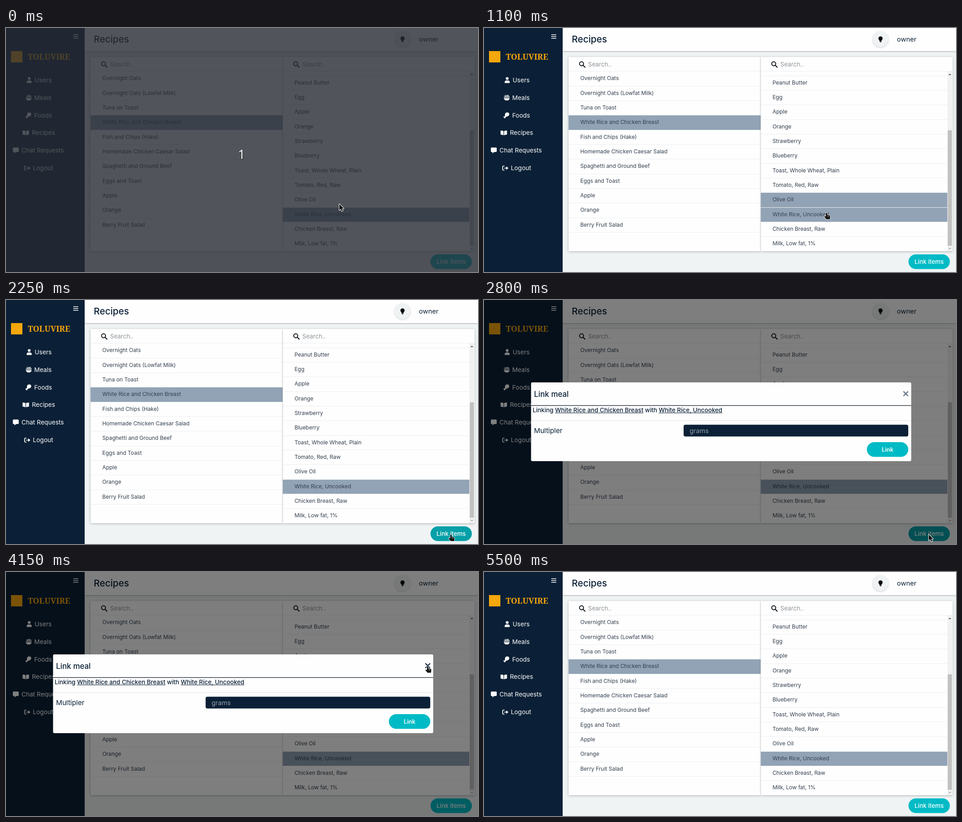
Animation, 1038 px wide and 539 px high, one loop 5900 ms. Source, as an HTML page with a canvas:

```html
<!DOCTYPE html>
<html lang="en">
<head>
<meta charset="utf-8">
<title>Recipes</title>
<style>
  html, body { margin: 0; width: 100%; height: 100%; overflow: hidden; background: #eff3f4; }
  canvas { display: block; }
</style>
</head>
<body>
<canvas id="stage" width="1038" height="539"></canvas>
<script>
const W = 1038, H = 539, LOOP = 5900, STEP = 50;
const ctx = document.getElementById('stage').getContext('2d');
const NAVY = '#0b2036', INK = '#34404f', PICKED = '#92a3b6', ORANGE = '#f5a70c', TEAL = [0, 187, 197], TEAL_DARK = [6, 160, 168];
const SANS = 'Inter, "Open Sans", sans-serif', SERIF = '"Noto Serif", serif';
const ROW = 32.33, LIST_TOP = 96, LIST_END = 493, MEALS_Y = 96.25, FOODS_Y = 105.55;

const meals = ['Overnight Oats', 'Overnight Oats (Lowfat Milk)', 'Tuna on Toast', 'White Rice and Chicken Breast',
  'Fish and Chips (Hake)', 'Homemade Chicken Caesar Salad', 'Spaghetti and Ground Beef', 'Eggs and Toast',
  'Apple', 'Orange', 'Berry Fruit Salad'];
const foods = ['Peanut Butter', 'Egg', 'Apple', 'Orange', 'Strawberry', 'Blueberry', 'Toast, Whole Wheat, Plain',
  'Tomato, Red, Raw', 'Olive Oil', 'White Rice, Uncooked', 'Chicken Breast, Raw', 'Milk, Low fat, 1%'];
const RICE_MEAL = 3, OLIVE = 8, RICE = 9;

// start, end, from, control, to
const moves = [
  [0, 200, [733, 389], [734, 385], [735, 381]],
  [900, 1100, [735, 381], [742, 396], [753, 408]],
  [1800, 2250, [753, 408], [860, 466], [978, 518]],
  [3150, 3750, [978, 518], [1008, 400], [946, 300]],
  [3750, 4150, [946, 300], [932, 180], [927, 208]],
  [4900, 5500, [927, 208], [510, 92], [89, -20]]
];

const ramp = (t, a, b) => Math.min(1, Math.max(0, (t - a) / (b - a)));
const smooth = u => u * u * (3 - 2 * u);
const mix = (a, b, u) => `rgb(${a.map((v, i) => Math.round(v + (b[i] - v) * u))})`;

function pointer(t) {
  const m = moves.filter(v => t >= v[0]).pop();
  const u = smooth(ramp(t, m[0], m[1])), k = 1 - u;
  return [0, 1].map(i => m[2][i] * k * k + 2 * m[3][i] * u * k + m[4][i] * u * u);
}

function rect(x, y, w, h, fill) {
  ctx.fillStyle = fill;
  ctx.fillRect(x, y, w, h);
}

function round(x, y, w, h, r, fill) {
  ctx.fillStyle = fill;
  ctx.beginPath();
  ctx.roundRect(x, y, w, h, r);
  ctx.fill();
}

function disc(x, y, r, fill) {
  ctx.fillStyle = fill;
  ctx.beginPath();
  ctx.arc(x, y, r, 0, Math.PI * 2);
  ctx.fill();
}

// y is the middle of the capitals; returns the width
function text(s, x, y, size, color, weight = 400, align = 'left', family = SANS) {
  ctx.font = `${weight} ${size}px ${family}`;
  ctx.textAlign = align;
  ctx.fillStyle = color;
  ctx.fillText(s, x, y + size * 0.36);
  return ctx.measureText(s).width;
}

function path(d, x, y, fill, stroke, width = 1.5) {
  const p = new Path2D(d);
  ctx.save();
  ctx.translate(x, y);
  ctx.lineJoin = ctx.lineCap = 'round';
  if (stroke) {
    ctx.strokeStyle = stroke;
    ctx.lineWidth = width;
    ctx.stroke(p);
  }
  if (fill) {
    ctx.fillStyle = fill;
    ctx.fill(p);
  }
  ctx.restore();
}

function shadowed(blur, alpha, draw) {
  ctx.save();
  ctx.shadowColor = `rgba(0,0,0,${alpha})`;
  ctx.shadowBlur = blur;
  ctx.shadowOffsetY = 1;
  draw();
  ctx.restore();
}

const menu = [
  ['Users', 63, 115, () => {
    disc(51, 111.5, 3.1, '#fff');
    path('M-5.5 6.5V5Q-5.5 1 -2 1H2Q5.5 1 5.5 5V6.5Z', 51, 115, '#fff');
  }],
  ['Meals', 62, 154, () => {
    path('M-6.5 1H6.5Q6 4 3.5 5V6H-3.5V5Q-6 4 -6.5 1Z', 50, 154, '#fff');
    path('M-6 -1H6M-4 -3H-2M0 -3H2M4 -3H5M-4 -5H-3M-1 -5H4', 50, 154, null, '#fff', 1.3);
  }],
  ['Foods', 62, 193, () => {
    path('M-3 2.5V-1.5Q-2.5 -6.5 2 -6.5Q6.5 -6.5 6.5 -2.5Q6 2 1 2.5L-2 4.5Q-2 7 -4 6.5Q-5 6 -5 5Q-7 4.5 -6 3Q-5 1.5 -3 2.5Z', 49, 193, '#fff');
  }],
  ['Recipes', 57, 231.5, () => {
    path('M-0.6 5.5Q-3 4 -7 4V-5Q-3 -5 -0.6 -3.8ZM0.6 5.5Q3 4 7 4V-5Q3 -5 0.6 -3.8Z', 43.5, 231.5, '#fff');
  }],
  ['Chat Requests', 34, 270, () => {
    round(15, 264, 13, 10, 2, '#fff');
    path('M-2.5 3V7L2.5 3Z', 21, 270, '#fff');
  }],
  ['Logout', 59, 309, () => {
    path('M-2.5 -4.5H-4.5Q-6 -4.5 -6 -3V3Q-6 4.5 -4.5 4.5H-2.5M-2 0H3', 47, 309.5, null, '#fff', 1.7);
    path('M1.8 -4L6.5 0L1.8 4Z', 47, 309.5, '#fff');
  }]
];

function sidebar() {
  rect(0, 0, 173, H, NAVY);
  for (const y of [14, 18, 22]) rect(148, y, 11, 1.5, '#fff');
  rect(11, 51, 25, 25, ORANGE);
  text('TOLUVIRE', 48, 64, 17.7, ORANGE, 900, 'left', SERIF);
  for (const [label, x, y, icon] of menu) {
    icon();
    text(label, x, y, 13.6, '#fff');
  }
}

function header() {
  shadowed(3, 0.3, () => rect(173, 0, W - 173, 51, '#fefefe'));
  text('Recipes', 193, 24.5, 20.4, NAVY, 500);
  shadowed(4, 0.2, () => disc(872, 25, 17, '#eff3f4'));
  disc(872, 23, 4.6, '#000');
  path('M-3 2H3L2 6H-2ZM-1.8 6.5H1.8V7.2L0.8 8H-0.8L-1.8 7.2Z', 872, 23.5, '#000');
  text('owner', 908, 24.5, 14.6, NAVY);
}

function panel(x, width, first, items, active) {
  shadowed(5, 0.28, () => rect(x, 64, 422, 429, '#fefefe'));
  path('M4 4L7.5 7.5', x + 28.5, 79, null, '#111820', 2.2);
  ctx.beginPath();
  ctx.arc(x + 28.5, 79, 4.4, 0, Math.PI * 2);
  ctx.lineWidth = 2;
  ctx.strokeStyle = '#111820';
  ctx.stroke();
  text('Search..', x + 43, 80, 13.2, '#8e9499');
  rect(x, 95, 422, 1, '#eceff1');
  if (first > LIST_TOP + 1) rect(x, Math.round(first) - 1, width, 1, '#eceff1');
  items.forEach((label, i) => {
    const y = first + i * ROW, top = Math.round(y), end = Math.min(LIST_END, Math.round(y + ROW));
    if (active.includes(i)) rect(x, top, width, end - top - 1, PICKED);
    if (end < LIST_END) rect(x, end - 1, width, 1, '#eceff1');
    text(label, x + 25.7, y + 14.8, 11.95, INK);
  });
}

function scrollbar() {
  rect(1019, 96, 12, 397, '#f1f1f1');
  rect(1020, 226, 9, 255, '#c1c1c1');
  path('M-3 1.5L0 -1.5L3 1.5Z', 1024.5, 102.5, '#505050');
  path('M-3 -1.5L0 1.5L3 -1.5Z', 1024.5, 487.5, '#a3a3a3');
}

function modal(hoverClose) {
  rect(0, 0, W, H, 'rgba(0,0,0,.5)');
  round(103.5, 182, 836, 174, 3, '#fefefe');
  text('Link meal', 110, 208, 16.8, NAVY, 500);
  path('M-4.5 -4.5L4.5 4.5M4.5 -4.5L-4.5 4.5', 927.5, 207, null, hoverClose ? NAVY : '#5d6f82', 2.3);
  rect(103.5, 232.5, 836, 1.3, '#1a2430');
  let x = 107;
  for (const [s, linked] of [['Linking ', 0], [meals[RICE_MEAL], 1], [' with ', 0], [foods[RICE], 1]]) {
    const w = text(s, x, 243, 13.25, NAVY, 500);
    if (linked) rect(x, 249, w, 1, NAVY);
    x += w;
  }
  rect(103.5, 266, 836, 1, '#dfe3e6');
  text('Multipler', 110, 288.5, 15.1, NAVY);
  round(439, 275.5, 494, 26, 4, NAVY);
  text('grams', 452, 288.5, 14.3, '#93a0ac');
  round(842, 314, 91, 32.5, 16.25, `rgb(${TEAL})`);
  text('Link', 887.5, 330, 12.8, '#fff', 600, 'center');
}

function cursor([x, y], hand) {
  if (hand) {
    path('M-1 1Q0.5 -1 2 1V5L7 6Q8.5 6.5 8.3 9L7.5 14.5H0L-4.5 9Q-4.5 7 -2.8 7.5L-1 8.5Z', x, y, '#111', '#fff', 1.6);
    path('M3 7V9M5.3 7.5V9.3', x, y, null, '#ddd', 0.8);
  } else {
    path('M0 0V13.5L3.2 10.6L5.4 15.6L7.8 14.5L5.6 9.7H9.8Z', x, y, '#111', '#fff', 2);
  }
}

function rowAt(y, first, count) {
  const i = Math.floor((y - first) / ROW);
  return y > LIST_TOP && y < LIST_END && i >= 0 && i < count ? i : -1;
}

function draw(t) {
  const pos = pointer(t), [x, y] = pos;
  const open = t >= 2800 && t < 4800;
  const live = t >= 50 && !open;
  const left = live && x >= 186 && x < 608 ? rowAt(y, MEALS_Y, meals.length) : -1;
  const right = live && x >= 609 && x < 1019 ? rowAt(y, FOODS_Y, foods.length) : -1;
  const onLink = live && x > 934 && x < 1024 && y > 500 && y < 532;
  const onClose = open && x > 917 && x < 938 && y > 196 && y < 219;
  const chosen = t >= 750 && t < 1700 ? OLIVE : RICE;

  rect(0, 0, W, H, '#eff3f4');
  header();
  sidebar();
  panel(186, 422.5, MEALS_Y, meals, [RICE_MEAL, left]);
  panel(608.7, 410.3, FOODS_Y, foods, [chosen, right]);
  scrollbar();
  const shade = ramp(t, 2100, 2250) - ramp(t, 2800, 3000);
  round(933.5, 500, 91, 32.5, 16.25, mix(TEAL, TEAL_DARK, shade));
  text('Link items', 979, 516, 13.3, '#fff', 500, 'center');
  if (open) modal(onClose);

  // countdown veil fading out
  const veil = t < 50 ? 1 : 0.75 * (1 - ramp(t, 0, 200)) ** 1.4;
  if (veil > 0) {
    ctx.globalAlpha = veil;
    rect(0, 0, W, H, 'rgba(38,42,49,.8)');
    shadowed(3, 0.8, () => text('1', 518, 279.3, 27, '#fff', 400, 'center', '"Noto Sans", sans-serif'));
    ctx.globalAlpha = 1;
  }
  if (t < 5500) cursor(pos, left >= 0 || right >= 0 || onLink || onClose);
}

const start = performance.now();
function tick() {
  const t = (performance.now() - start) % LOOP;
  draw(Math.floor(t / STEP) * STEP);
  requestAnimationFrame(tick);
}
tick();
</script>
</body>
</html>
```
